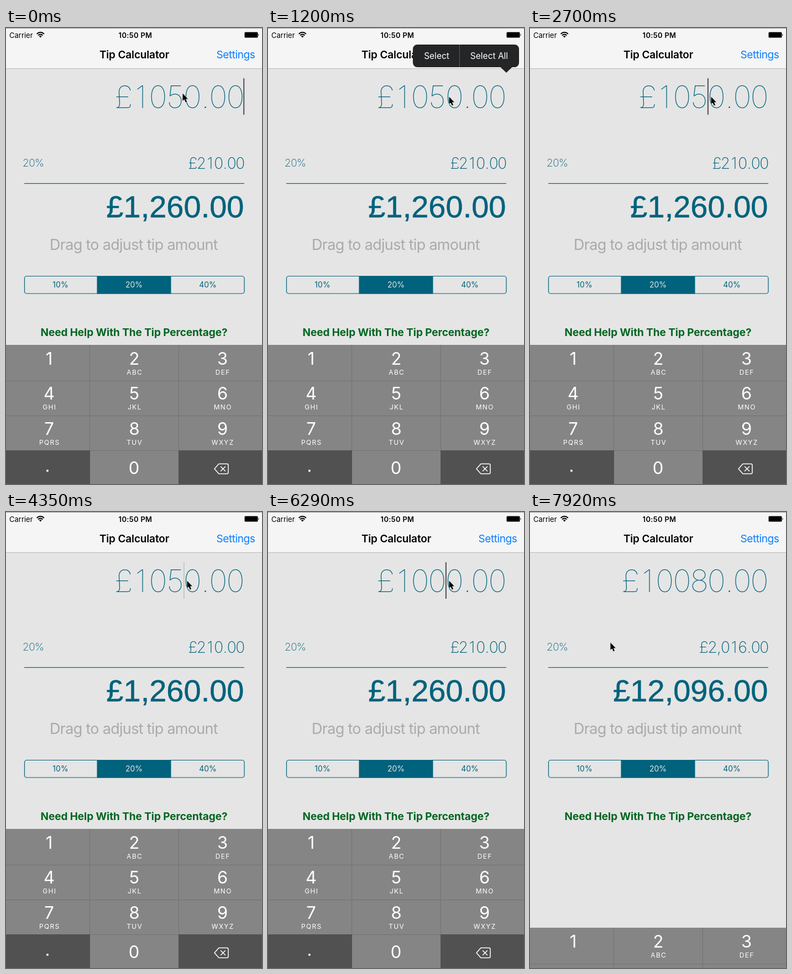
An HTML page for the animation above (8 s loop, 463 by 826 pixels).

```html
<!DOCTYPE html>
<html lang="en">
<head>
<meta charset="utf-8">
<title>Tip calculator</title>
<style>
  html, body { margin: 0; width: 100%; height: 100%; overflow: hidden; background: #e5e5e5; }
  svg { display: block; width: 463px; height: 826px; font-family: Inter, "Open Sans", sans-serif; }
  .mid { text-anchor: middle; }
  .end { text-anchor: end; }
  .thin { font-weight: 100; font-optical-sizing: none; text-anchor: middle; fill: #00627c; }
  .total { font: 56px "Liberation Sans", Arial, sans-serif; text-anchor: end; stroke: #00627c; stroke-width: .5; }
  .key { font-size: 31px; text-anchor: middle; }
  .sub { font-size: 12px; letter-spacing: 1.25px; text-anchor: middle; }
</style>
</head>
<body>
<svg viewBox="0 0 463 826">
  <rect width="463" height="826" fill="#e5e5e5"/>
  <rect width="463" height="73" fill="#f5f5f5"/>
  <rect y="73" width="463" height="1" fill="#b9b9b9"/>
  <rect width="463" height="1" fill="#999"/>

  <text x="6" y="17.5" font-size="13">Carrier</text>
  <g fill="none" stroke="#000" stroke-width="1.9">
    <path d="M55.6 10.8Q62.3 4.8 69 10.8M58 13.4Q62.3 9.6 66.6 13.4"/>
  </g>
  <path d="M59.8 15Q62.3 13 64.8 15L62.3 17.6Z"/>
  <text x="234" y="17.5" class="mid" font-size="13" font-weight="600" letter-spacing=".3">10:50 PM</text>
  <rect x="431.5" y="7.5" width="24" height="10" rx="1.5"/>
  <path d="M456.5 10.5q2 2 0 4z"/>

  <text x="232" y="55" class="mid" font-size="19" font-weight="600" letter-spacing="-.15">Tip Calculator</text>
  <text x="450.5" y="55" class="end" font-size="19" letter-spacing="-.4" fill="#0a7cff">Settings</text>

  <g id="bill" class="thin" font-size="56"></g>
  <g id="tip" class="thin" font-size="28" style="font-weight:200"></g>
  <g fill="#00627c">
    <text x="30" y="251" font-size="19" font-weight="200" letter-spacing="-.6">20%</text>
    <rect x="33" y="281" width="398" height="1.2"/>
    <text id="total" class="total" x="430.5" y="342.5"></text>
  </g>
  <text x="231" y="402" class="mid" font-size="27" letter-spacing="-.7" fill="#aaa">Drag to adjust tip amount</text>

  <rect x="33.5" y="449.5" width="397.5" height="31.5" rx="4" fill="none" stroke="#00627c" stroke-width="1.2"/>
  <rect x="164.5" y="449" width="134" height="32.5" fill="#00627c"/>
  <g class="mid" font-size="14" fill="#00627c">
    <text x="98.5" y="470">10%</text>
    <text x="231.5" y="470" fill="#e5e5e5">20%</text>
    <text x="365" y="470">40%</text>
  </g>
  <text x="231.5" y="557.5" class="mid" font-size="19" font-weight="700" letter-spacing="-.08" fill="#00651f">Need Help With The Tip Percentage?</text>

  <rect id="caret" y="91" width="2.2" height="66" fill="#5c5c5c"/>

  <g id="pad">
    <rect y="574" width="463" height="252" fill="#858585"/>
    <path d="M0 639.5H463M0 702.5H463M0 765.5H463M151.5 574V826M312.5 574V826" stroke="#727272"/>
    <path d="M0 765H152V826H0ZM312 765H463V826H312Z" fill="#515151"/>
    <g id="keys" fill="#fff"></g>
    <g fill="none" stroke="#fff" stroke-width="1.5" stroke-linecap="round" stroke-linejoin="round">
      <path d="M385 789.5H399.5Q402 789.5 402 792V805Q402 807.5 399.5 807.5H385L377 798.5Z"/>
      <path d="M388.5 794.5l8 8m0-8l-8 8"/>
    </g>
  </g>

  <g id="menu">
    <path d="M270 30H446a8 8 0 0 1 8 8V63a8 8 0 0 1-8 8H441.5L431 81 420.5 71H270a8 8 0 0 1-8-8V38a8 8 0 0 1 8-8Z" fill="#242526"/>
    <path d="M346.5 30V71" stroke="#5c5c5c"/>
    <g class="mid" font-size="15.5" fill="#fff">
      <text x="305" y="56">Select</text>
      <text x="400" y="56">Select All</text>
    </g>
  </g>
  <path id="mouse" d="M0 0V13.5L3 10.8 5.2 16 7.6 15 5.4 10H9.5Z" stroke="#fff" stroke-width="1" paint-order="stroke"/>
</svg>
<script>
const $ = id => document.getElementById(id);
const LOOP = 8000;

// Each entry changes only the properties it names.
const steps = [
  [0, { bill: '£1050.00', tip: '£210.00', total: '£1,260.00', caret: 1, at: 430, menu: 0, mouse: [319.5, 118.5], pad: 0 }],
  [150, { caret: .3, mouse: [327.5, 124.5] }],
  [300, { caret: 0 }],
  [600, { caret: 1 }],
  [900, { menu: .5 }],
  [1050, { menu: 1, caret: .3 }],
  [1200, { caret: 0 }],
  [1650, { menu: .4, caret: .4 }],
  [1800, { menu: 0, caret: 0 }],
  [2250, { caret: 1, at: 399.5 }],
  [2400, { at: 368.5 }],
  [2550, { at: 353 }],
  [2700, { at: 321.7 }],
  [3300, { caret: .2 }],
  [3450, { caret: 0 }],
  [3750, { caret: .5 }],
  [3900, { caret: 1 }],
  [4350, { caret: .2 }],
  [4500, { caret: .5, bill: '£100.00' }],
  [4650, { caret: 1 }],
  [5100, { caret: .2 }],
  [5250, { caret: 0 }],
  [5550, { caret: .5 }],
  [5690, { caret: 1 }],
  [6140, { caret: .2 }],
  [6290, { caret: 1, bill: '£1000.00' }],
  [6440, { bill: '£10080.00' }],
  [7030, { caret: .2 }],
  [7180, { caret: 0, mouse: [145.5, 236.5] }],
  [7470, { caret: 1 }],
  [7920, { caret: 0, tip: '£2,016.00', total: '£12,096.00', pad: 179 }],
];

const text = (cls, x, y, s) => `<text class="${cls}" x="${x}" y="${y}">${s}</text>`;

// Right-aligned figures on an even pitch; punctuation takes half a cell.
function figures(s, right, y, pitch) {
  let x = right;
  return [...s].reverse().map(c => {
    const w = '.,'.includes(c) ? pitch / 2 : pitch;
    x -= w;
    return text('', x + w / 2, y, c);
  }).join('');
}

const letters = ['', 'ABC', 'DEF', 'GHI', 'JKL', 'MNO', 'PQRS', 'TUV', 'WXYZ'];
const cols = [78, 232, 391.5];
$('keys').innerHTML = letters.map((sub, i) => {
  const x = cols[i % 3], y = 609.7 + 63.5 * Math.floor(i / 3);
  return text('key', x, y, i + 1) + text('sub', x + .7, y + 17.8, sub);
}).join('') + text('key', 75, 803.5, '.') + text('key', 231.5, 808, '0');

let shown = -1;
function draw(now) {
  const t = now % LOOP;
  const n = steps.filter(([at]) => at <= t).length;
  if (n !== shown) {
    shown = n;
    const s = Object.assign({}, ...steps.slice(0, n).map(p => p[1]));
    $('bill').innerHTML = figures(s.bill, 430.5, 145, 31.1);
    $('tip').innerHTML = figures(s.tip, 431.5, 254.5, 15.6);
    $('total').textContent = s.total;
    $('caret').setAttribute('x', s.at - .9);
    $('caret').setAttribute('opacity', s.caret);
    $('menu').setAttribute('opacity', s.menu);
    $('mouse').setAttribute('transform', `translate(${s.mouse})`);
    $('pad').setAttribute('transform', `translate(0 ${s.pad})`);
  }
  requestAnimationFrame(draw);
}
draw(0);
</script>
</body>
</html>
```
